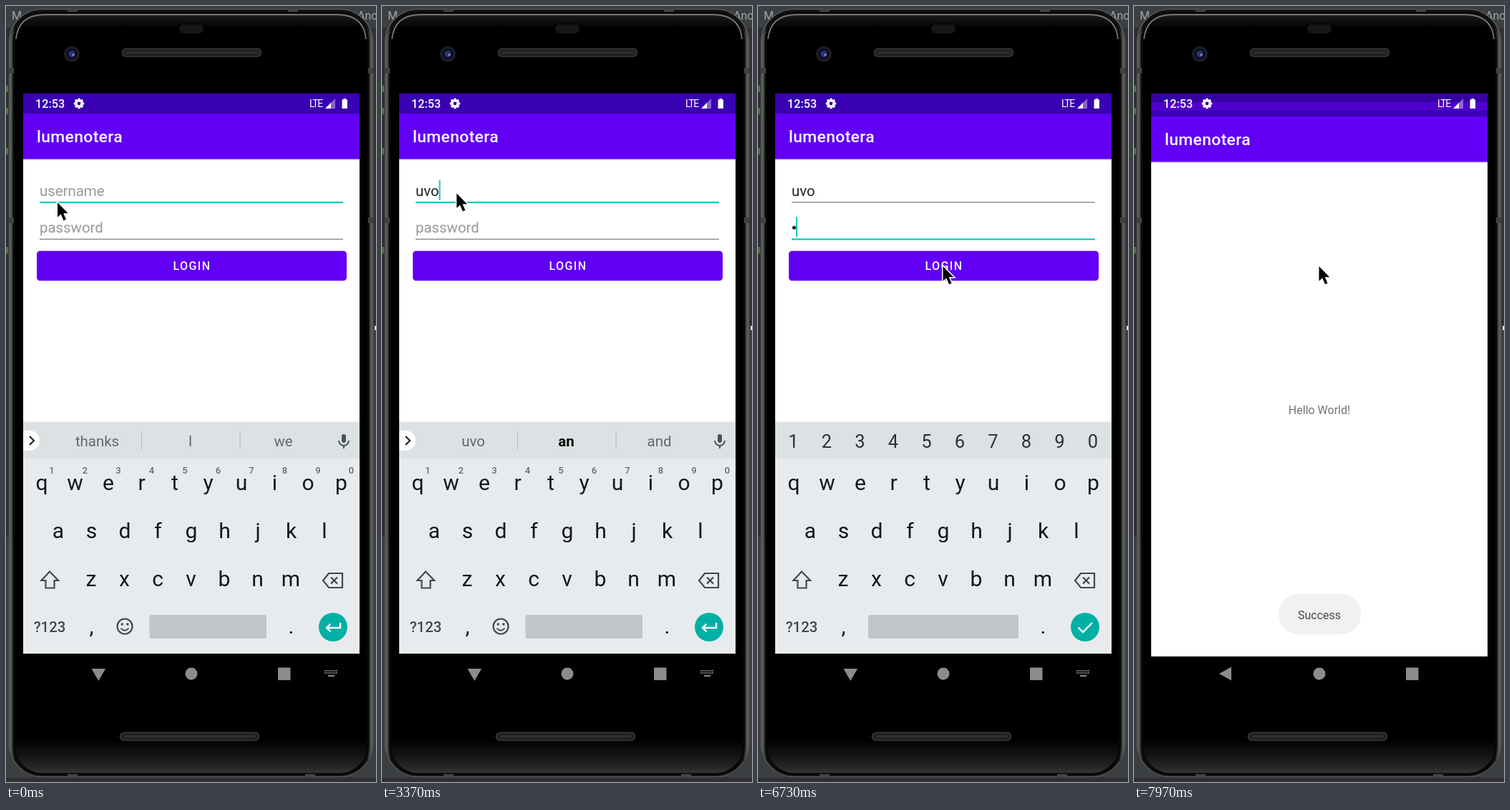
An HTML page that plays this animation: 517x1082 px, repeating every 8000 ms.

```html
<!DOCTYPE html>
<html lang="en">
<head>
<meta charset="utf-8">
<title>Login</title>
<style>
  html, body { margin: 0; height: 100%; overflow: hidden; background: #3c3f41; }
  svg { display: block; width: 517px; height: 1082px; font-family: Roboto, sans-serif; }
  .mid { text-anchor: middle; }
  .line { fill: none; stroke: #3b4a51; stroke-width: 2.2; }
</style>
</head>
<body>
<svg id="stage" viewBox="0 0 517 1082" xmlns="http://www.w3.org/2000/svg"></svg>
<script>
const VIOLET = '#6200f5', STATUS = '#3a00b3', TEAL = '#14cdb6', KEY = '#0c1a21', GREY = '#5f696f';
const APP = 'lumenotera', USER = 'uvo';

const rect = (x, y, w, h, fill, extra = '') =>
  `<rect x="${x}" y="${y}" width="${w}" height="${h}" fill="${fill}" ${extra}/>`;
const circle = (x, y, r, fill, extra = '') => `<circle cx="${x}" cy="${y}" r="${r}" fill="${fill}" ${extra}/>`;
const path = (d, fill, extra = '') => `<path d="${d}" fill="${fill}" ${extra}/>`;
const line = (d, extra = '') => `<path class="line" d="${d}" ${extra}/>`;
const text = (s, x, y, size, fill, extra = '') =>
  `<text x="${x}" y="${y}" font-size="${size}" fill="${fill}" ${extra}>${s}</text>`;
const mid = (s, x, y, size, fill, extra = '') => text(s, x, y, size, fill, `class="mid" ${extra}`);
const group = (id, body, extra = '') => `<g id="${id}" ${extra}>${body}</g>`;
const row = (chars, x, y, size, fill, extra) =>
  [...chars].map((c, i) => mid(c, x + i * 46.5, y, size, fill, extra)).join('');
const gradient = (id, dir, ...stops) => `<linearGradient id="${id}" ${dir}>` +
  stops.map(([at, color]) => `<stop offset="${at}" stop-color="${color}"/>`).join('') + '</linearGradient>';

const speaker = (x, y) => rect(x, y, 194, 11, '#202020', 'rx="5.5" stroke="#393939" stroke-width="1.5"') +
  rect(x + 5, y + 4, 184, 3, '#303030', 'rx="1.5"');

function phone() {
  return rect(0, 0, 517, 1082, '#3c3f41') +
    rect(0, 30, 6, 710, '#2d2f30') + rect(511, 30, 6, 420, '#303233') +
    rect(0, 1076, 517, 6, '#303033') +
    text('M', 8, 19, 16, '#a0a3a5') + text('Anc', 491, 19, 16, '#a0a3a5') +
    [111, 142, 198, 336].map(y => rect(0, y, 3, 9, '#52704b')).join('') +
    rect(515, 446, 2, 6, '#ddd') +
    rect(4.5, 4.5, 508, 1070, 'url(#metal)', 'rx="46" stroke="#555" stroke-width="1.5"') +
    rect(11, 10, 495, 1061, 'url(#face)', 'rx="40" stroke="#080808" stroke-width="3"') +
    path('M14 46Q17 13 52 12H465Q500 13 503 46', 'none', 'stroke="#777" stroke-width="1.8"') +
    [86, 295].map(y => rect(4, y, 7, 8, '#414141') + rect(506, y, 7, 8, '#414141')).join('') +
    rect(86, 3, 14, 5, '#444') + rect(394, 3, 14, 5, '#444') +
    rect(86, 1071, 14, 5, '#444') + rect(418, 1071, 14, 5, '#444') +
    rect(242, 26, 34, 12, '#171717', 'rx="6"') +
    circle(92, 67, 11, '#1d1e24') + circle(92, 67, 7.5, '#0c0e1e') +
    circle(92, 67, 4.5, '#26347c') + circle(94, 68, 1.6, '#8797e8') +
    speaker(162.5, 59.5) + speaker(159.5, 1013);
}

function statusIcons() {
  const teeth = [0, 45, 90, 135].map(a =>
    rect(100.2, 128.8, 3.6, 14.4, '#fff', `rx="1" transform="rotate(${a} 102 136)"`)).join('');
  return text('12:53', 41, 142, 16.2, '#fff', 'font-weight="500"') +
    teeth + circle(102, 136, 5.4, '#fff') + circle(102, 136, 2.4, STATUS) +
    text('LTE', 424, 141, 14, '#fff', 'letter-spacing="-1.4"') +
    path('M446 143L460 129V143Z', '#fff', 'opacity=".4"') + path('M446 143L454 135V143Z', '#fff') +
    path('M469.5 130.5H471.5V129H475V130.5H477V143H469.5Z', '#fff');
}

const appBar = () => rect(24, 150, 470, 63.5, VIOLET) +
  text(APP, 43, 190, 22.9, '#fff', 'font-weight="500" letter-spacing=".35"');

function loginScreen() {
  return rect(24, 122, 470, 781, '#fff') + rect(24, 122, 470, 28, STATUS) +
    rect(24, 213, 470, 2, '#e6e6e6') + appBar() +
    text('', 47, 265, 20.4, '', 'id="name"') + text('', 47, 316, 20.4, '', 'id="pass"') +
    circle(50.5, 309, 2.6, '#222', 'id="dot"') +
    rect(47, 0, 424, 2, '', 'id="nameLine"') + rect(47, 0, 424, 2, '', 'id="passLine"') +
    rect(47, 243, 2, 28, TEAL, 'id="caret"') +
    rect(43, 341.5, 433, 41.5, VIOLET, 'rx="4.5"') +
    `<clipPath id="button">${rect(43, 341.5, 433, 41.5, '#000', 'rx="4.5"')}</clipPath>` +
    circle(259, 363, 0, '#fff', 'id="ripple" clip-path="url(#button)"') +
    mid('LOGIN', 260, 368, 16, '#fff', 'font-weight="500" letter-spacing="1.43"');
}

function keyboard() {
  const suggestions = [127.5, 257.5, 387.5].map((x, i) => mid('', x, 613.5, 20.4, GREY, `id="word${i}"`)).join('');
  const wordBar = path('M24 592H33A14 14 0 0 1 33 620H24Z', '#fff') +
    line('M33 600L39 606L33 612', 'style="stroke:#222"') + suggestions +
    rect(189, 592, 1, 27, '#b5bbbf') + rect(326.5, 592, 1, 27, '#b5bbbf') +
    rect(469, 597, 6, 12, '#46535a', 'rx="3"') + line('M465 606A7 7 0 0 0 479 606M472 613V617', 'style="stroke-width:1.8"') +
    row('1234567890', 64, 652, 13, GREY, 'font-weight="500"') +
    circle(166, 865, 10.5, 'none', 'class="line"') + circle(162.2, 862, 1.7, '#3b4a51') + circle(169.8, 862, 1.7, '#3b4a51') +
    line('M160.5 867.5Q166 874 171.5 867.5', 'style="stroke-width:1.8"') +
    rect(200.5, 849, 163.5, 33, '#bfc5c9', 'rx="3"');
  const digitBar = row('1234567890', 49.5, 615.5, 25.5, '#26343b') +
    rect(154, 849, 210, 33, '#bfc5c9', 'rx="3"');
  return rect(24, 579, 470, 2, '#edf0f1') + rect(24, 580.5, 470, 51, '#dce1e4') + rect(24, 631, 470, 272, '#e8ebee') +
    group('words', wordBar) + group('digits', digitBar) +
    row('qwertyuiop', 50, 674.5, 30, KEY) + row('asdfghjkl', 73, 741.5, 30, KEY) + row('zxcvbnm', 119, 808.5, 30, KEY) +
    line('M61 788.5L73 801H67.5V811.5H55.5V801H49.5Z') +
    line('M451 791H470V811H451L443 801ZM454 796.5L463 805.5M463 796.5L454 805.5') +
    mid('?123', 61, 873, 20.4, '#3b4a51', 'font-weight="500"') + mid(',', 119.5, 875, 30, KEY) + mid('.', 398.5, 875, 30, KEY) +
    circle(457, 866, 20, '#00b0a4') +
    path('M467 860V867H448M453.5 861.5L448 867L453.5 872.5', 'none', 'id="enter" stroke="#fff" stroke-width="2.4"') +
    path('M447.5 866.5L454 873L467 860', 'none', 'id="check" stroke="#fff" stroke-width="2.4"');
}

function navigation() {
  let dots = '';
  for (let i = 0; i < 14; i++) dots += rect(445 + i % 7 * 2.7, 926 + (i / 7 | 0) * 3, 1.7, 1.9, '#888');
  return circle(259, 931, 8.5, '#8c8c8c') + rect(380, 922.5, 17.5, 17.5, '#8c8c8c') +
    group('navTyping', path('M119.5 924H139L129.2 941Z', '#8c8c8c') + dots + rect(450, 933, 9, 2, '#888')) +
    path('M119 931L136 921.5V940.5Z', '#8c8c8c', 'id="navBack"');
}

const homeScreen = () => rect(24, 200, 470, 703, '#fff') +
  rect(24, 122, 470, 40, STATUS) + rect(24, 122, 470, 20, '#5000cc') +
  rect(24, 213, 470, 2, '#e6e6e6') + appBar() + mid('Hello World!', 259, 565, 16, '#757575');

document.getElementById('stage').innerHTML =
  '<defs>' +
  gradient('metal', '', [0, '#707070'], [.009, '#3a3a3a'], [.016, '#101010'], [.984, '#101010'], [.991, '#3a3a3a'], [1, '#707070']) +
  gradient('face', 'x2="0" y2="1"', [0, '#202020'], [.02, '#000'], [.955, '#000'], [.99, '#252525'], [1, '#383838']) +
  `<clipPath id="reveal">${rect(24, 903, 470, 900, '#000', 'id="revealBox"')}</clipPath></defs>` +
  phone() + loginScreen() + keyboard() + navigation() + rect(24, 122, 470, 781, '#000', 'id="dim"') +
  group('home', group('homeBody', homeScreen()), 'clip-path="url(#reveal)"') + statusIcons() +
  group('toast', rect(202, 820, 115, 56, '#f1f1f0', 'rx="27"') + mid('Success', 259, 854.5, 16, '#484848')) +
  path('M0 0V20.5L4.7 16.3L8.5 25L12 23.4L8.2 15H14.7Z', '#000',
    'id="mouse" stroke="#fff" stroke-width="3" paint-order="stroke"');

const el = Object.fromEntries([...document.querySelectorAll('[id]')].map(e => [e.id, e]));
const set = (e, attrs) => { for (const k in attrs) e.setAttribute(k, attrs[k]); };
const show = (e, on) => { e.style.display = on ? '' : 'none'; };
const clamp = v => Math.min(1, Math.max(0, v));
const span = (t, from, to) => clamp((t - from) / (to - from));

// Pointer stops: time, x, y
const route = [[0, 72, 274], [250, 72, 274], [850, 149, 263], [1300, 149, 263], [2100, 104.5, 261], [3350, 104.5, 261],
  [3850, 71.5, 310.5], [4900, 71.5, 310.5], [5700, 258.5, 363], [8000, 258.5, 363]];
function pointer(t) {
  const i = route.findIndex(p => p[0] > t);
  const [t0, x0, y0] = route[i - 1], [t1, x1, y1] = route[i];
  const u = span(t, t0, t1), k = u * u * (3 - 2 * u);
  return [x0 + (x1 - x0) * k, y0 + (y1 - y0) * k];
}

const LETTERS = [2650, 2850, 3050], FOCUS = 3900, SWITCH = 4170, SECRET = 4600, MASK = 6100, PRESS = 6850, OPEN = 7700;

function draw(t) {
  const typed = USER.slice(0, LETTERS.filter(at => t >= at).length);
  const inPass = t >= FOCUS, secret = t >= SECRET, masked = t >= MASK;

  el.name.textContent = typed || 'username';
  set(el.name, { fill: typed ? '#222' : '#999' });
  el.pass.textContent = masked ? '' : secret ? 'a' : 'password';
  set(el.pass, { fill: secret ? '#222' : '#999' });
  show(el.dot, masked);
  const underline = (e, y, on) => set(e, { y: on ? y - .5 : y, height: on ? 2.3 : 1.1, fill: on ? TEAL : '#6c6c6c' });
  underline(el.nameLine, 273.2, !inPass);
  underline(el.passLine, 324.6, inPass);

  const lastInput = [150, ...LETTERS, FOCUS, SECRET].filter(at => t >= at).pop() ?? -850;
  show(el.caret, (t - lastInput) % 1000 < 500);
  const field = inPass ? el.pass : el.name;
  const width = masked ? 6 : (inPass ? secret : typed) ? field.getComputedTextLength() : 0;
  set(el.caret, { x: 47 + width, y: inPass ? 294 : 243 });

  const words = typed ? [typed, 'an', 'and'] : ['thanks', 'I', 'we'];
  words.forEach((w, i) => { el['word' + i].textContent = w; });
  set(el.word1, typed ? { 'font-weight': 700, fill: '#000' } : { 'font-weight': 400, fill: GREY });
  const digits = t >= SWITCH;
  show(el.words, !digits);
  show(el.enter, !digits);
  show(el.digits, digits);
  show(el.check, digits);

  set(el.ripple, { r: 225 * span(t, PRESS, PRESS + 225), opacity: .24 * (1 - span(t, PRESS + 150, PRESS + 500)) });

  const opened = t >= OPEN, left = 1 - span(t, OPEN, OPEN + 425);
  show(el.home, opened);
  show(el.navBack, opened);
  show(el.navTyping, !opened);
  set(el.dim, { opacity: .15 * (1 - left) });
  set(el.revealBox, { y: Math.round(122 + 781 * left ** 4.1) });
  set(el.homeBody, { transform: `translate(0 ${30 * left ** 2})` });
  set(el.toast, { opacity: span(t, 7750, 7900) });
  set(el.mouse, { transform: `translate(${pointer(t)})` });
}

function tick(now) {
  draw(now % 8000);
  requestAnimationFrame(tick);
}
draw(0);
requestAnimationFrame(tick);
</script>
</body>
</html>
```
